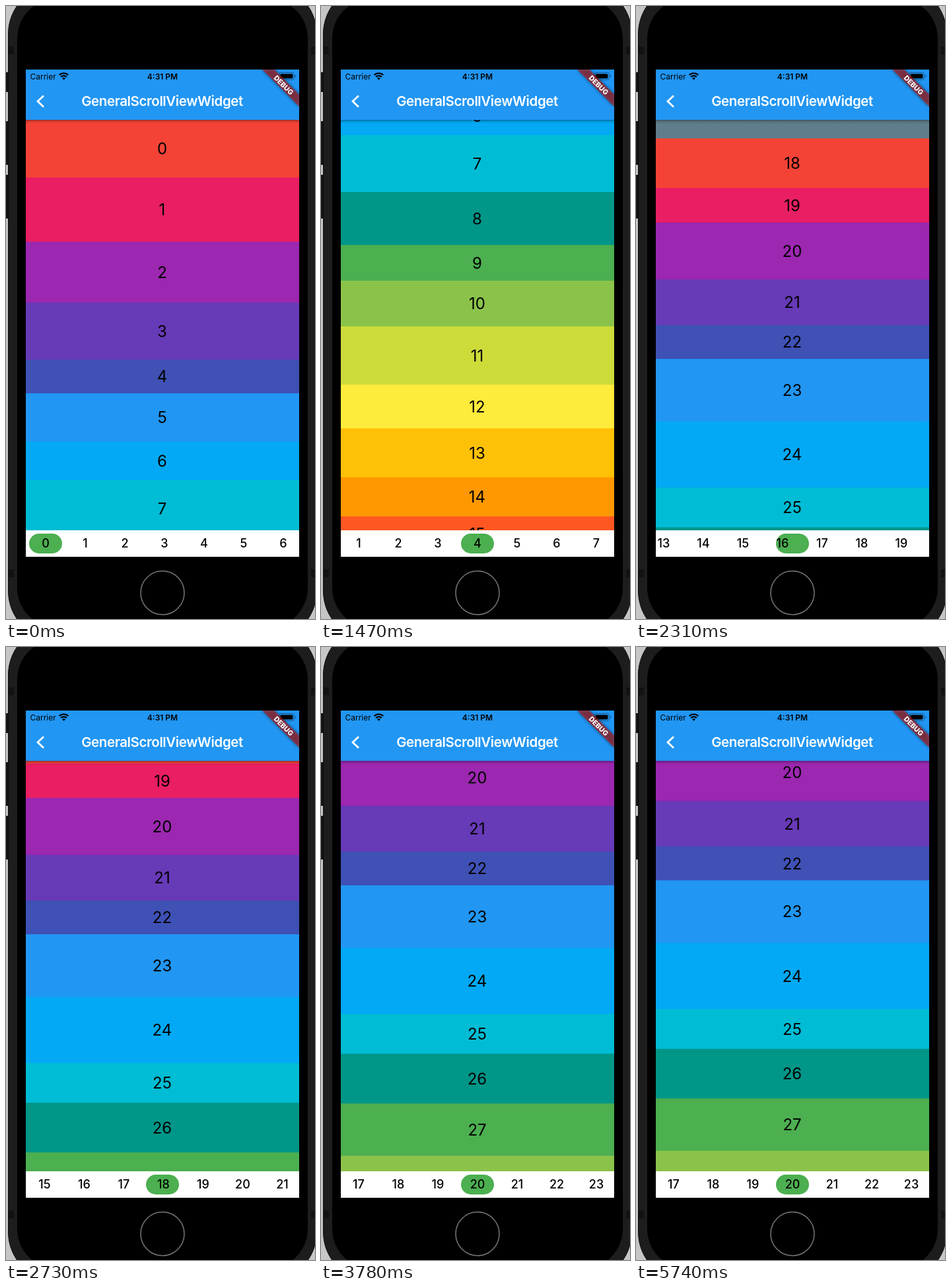
Recreate the animation shown at these times as an HTML page. Size 468 by 926 pixels, loop 5.81 s.

```html
<!DOCTYPE html>
<html lang="en">
<head>
<meta charset="utf-8">
<title>Scroll view with linked tabs</title>
<style>
  html, body { margin: 0; width: 100%; height: 100%; overflow: hidden; background: #c6c6c6; }
  svg { display: block; }
  text { font-family: Inter, "Open Sans", sans-serif; }
  .mid { text-anchor: middle; }
  #rows text { font-size: 24px; }
  #tabs text { font-size: 18px; font-weight: 500; }
  .status { font-size: 12px; }
  .title { font-size: 20.5px; font-weight: 600; letter-spacing: -.4px; fill: #fff; }
  .debug { font-size: 10.5px; font-weight: 800; fill: #fff; }
</style>
</head>
<body>
<svg width="468" height="926" viewBox="0 0 468 926">
  <defs>
    <clipPath id="screen"><rect x="30" y="96" width="414" height="736"/></clipPath>
    <clipPath id="list"><rect x="30" y="172" width="414" height="620"/></clipPath>
    <linearGradient id="shade" x2="0" y2="1">
      <stop offset="0" stop-opacity=".36"/>
      <stop offset=".4" stop-opacity=".12"/>
      <stop offset="1" stop-opacity="0"/>
    </linearGradient>
    <filter id="blur" x="-30%" y="-30%" width="160%" height="160%"><feGaussianBlur stdDeviation="2.5"/></filter>
    <path id="ribbon" d="M388 96H406.500L444 133.500V152Z"/>
  </defs>

  <!-- phone -->
  <path d="M0 100h5v30H0zM0 174h5v66H0zM0 255h5v66H0z" fill="#151515"/>
  <rect x="3.500" y="-32" width="467" height="990" rx="74" fill="#1d1d1d" stroke="#0a0a0a"/>
  <path d="M4 61h8v12H4zM4 851h8v12H4zM462 61h8v12h-8zM462 851h8v12h-8z" fill="#121212"/>
  <rect x="17" y="-11" width="440" height="950" rx="60"/>
  <circle cx="237" cy="886.500" r="33" fill="none" stroke="#777" stroke-width="1.500"/>

  <g clip-path="url(#screen)">
    <g clip-path="url(#list)"><g id="rows"></g></g>
    <rect x="30" y="172" width="414" height="6" fill="url(#shade)"/>

    <rect x="30" y="792" width="414" height="40" fill="#fff"/>
    <g id="tabs"><rect id="pill" x="-25" y="797" width="50" height="30" rx="15" fill="#4caf50"/></g>

    <!-- status and app bar -->
    <rect x="30" y="96" width="414" height="76" fill="#2196f3"/>
    <text class="status" x="36.500" y="111">Carrier</text>
    <g fill="none" stroke="#000" stroke-width="2.200">
      <path d="M80.700 104.300a9.600 9.600 0 0 1 13.600 0M83.200 107.100a6.100 6.100 0 0 1 8.600 0"/>
    </g>
    <path d="M87.500 111.700l-2.300-2.500a3.300 3.300 0 0 1 4.600 0z"/>
    <text class="status mid" x="237" y="111" font-weight="600">4:31 PM</text>
    <rect x="413.500" y="100.500" width="23" height="11" rx="3" fill="none" stroke="#000" stroke-opacity=".4"/>
    <rect x="415.500" y="102.500" width="19" height="7" rx="1.500"/>
    <path d="M438 104v4q1.500-.5 1.500-2t-1.500-2" opacity=".4"/>
    <path d="M57 135.500L48 144l9 8.500" fill="none" stroke="#fff" stroke-width="2.800"/>
    <text class="title mid" x="236.500" y="151.300">GeneralScrollViewWidget</text>

    <use href="#ribbon" opacity=".5" filter="url(#blur)"/>
    <use href="#ribbon" fill="#b71c1c" opacity=".627"/>
    <text class="debug mid" transform="translate(420.500 119.500) rotate(45)" y="3.800">DEBUG</text>
  </g>
</svg>
<script>
const LOOP = 5810, STEP = 70, TAB_EASE = 340;
const TOP = 172, CENTER = 237, TAB = 60;
const colors = ('f44336 e91e63 9c27b0 673ab7 3f51b5 2196f3 03a9f4 00bcd4 009688 ' +
  '4caf50 8bc34a cddc39 ffeb3b ffc107 ff9800 ff5722 795548 607d8b').split(' ');
const heights = [87, 97, 92, 86.5, 50.5, 73, 58, 86, 80, 54, 69, 88, 66, 74, 59,
  53, 66, 93, 75, 52, 86, 69, 51, 94.5, 100, 60, 75, 79, 80];

// [time ms, scroll px, speed px/ms]: a drag, a second flick, then friction
const knots = [[430, 0, 0], [595, 87, .6], [840, 186, .35], [1260, 370, .3], [1470, 521, 1.93],
  [1960, 1120, .73], [2730, 1403, .165], [3780, 1477, .018], [4620, 1484.5, 0]];

const $ = id => document.getElementById(id);

function add(parent, tag, attrs, text = '') {
  const el = document.createElementNS('http://www.w3.org/2000/svg', tag);
  for (const key in attrs) el.setAttribute(key, attrs[key]);
  el.textContent = text;
  parent.append(el);
}

// Cubic Hermite through the knots
function scrollAt(t) {
  const i = knots.findIndex(k => k[0] > t);
  if (i === 0) return 0;
  if (i < 0) return knots[knots.length - 1][1];
  const [t0, y0, v0] = knots[i - 1], [t1, y1, v1] = knots[i];
  const d = t1 - t0, u = (t - t0) / d, w = 1 - u;
  return y0 + (y1 - y0) * u * u * (3 - 2 * u) + d * u * w * (v0 * w - v1 * u);
}

const tops = [];
let y = 0;
heights.forEach((h, i) => {
  tops.push(y);
  // one extra pixel hides seams; the next row covers it
  add($('rows'), 'rect', { x: 30, y: TOP + y, width: 414, height: h + 1, fill: '#' + colors[i % colors.length] });
  add($('rows'), 'text', { x: CENTER - .5, y: TOP + y + h / 2 + 8.7, class: 'mid' }, i);
  add($('tabs'), 'text', { x: TAB * (i + 1), y: 818, class: 'mid' }, i);
  y += h;
});

// Moments at which each following row reaches the top
const crossings = [];
for (let t = 0; t < LOOP; t++)
  while (scrollAt(t) >= tops[crossings.length + 1]) crossings.push(t);

// Each crossing pushes the pill one tab along over TAB_EASE
const tabAt = t => crossings.reduce((sum, c) => sum + Math.min(1, Math.max(0, (t - c) / TAB_EASE)), 0);

function draw(now) {
  const t = Math.floor(now % LOOP / STEP) * STEP;
  const pill = TAB * (tabAt(t) + 1);
  $('rows').setAttribute('transform', `translate(0 ${-scrollAt(t)})`);
  $('pill').setAttribute('transform', `translate(${pill} 0)`);
  $('tabs').setAttribute('transform', `translate(${Math.min(0, CENTER - pill)} 0)`);
  requestAnimationFrame(() => draw(performance.now() - start));
}

const start = performance.now();
draw(0);
</script>
</body>
</html>
```
